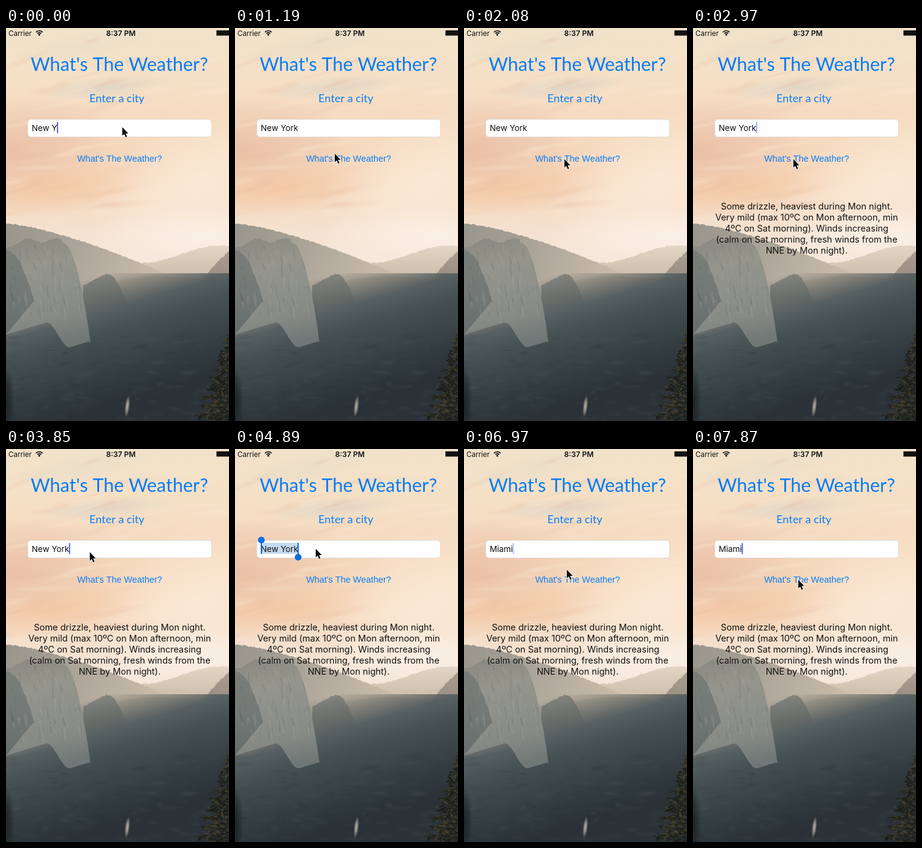
An HTML page with a canvas that plays this animation: 364x641 px, repeating every 8 s.

```html
<!DOCTYPE html>
<html lang="en">
<head>
<meta charset="utf-8">
<title>What's The Weather?</title>
<style>
html, body { margin: 0; width: 100%; height: 100%; overflow: hidden; background: #f3dfc6; }
canvas { display: block; width: 364px; height: 641px; }
</style>
</head>
<body>
<canvas id="stage"></canvas>
<script>
const W = 364, H = 641, LOOP = 8000, TICK = 148.2;
const BLUE = '#087cf5', INK = '#111', SANS = 'Inter, "Open Sans", sans-serif';
const ratio = window.devicePixelRatio || 1;

function setup(canvas) {
  canvas.width = W * ratio;
  canvas.height = H * ratio;
  const c = canvas.getContext('2d');
  c.scale(ratio, ratio);
  return c;
}
const ctx = setup(document.getElementById('stage'));
const photo = document.createElement('canvas');
const bg = setup(photo);

let seed = 11;
const rnd = () => (seed = (seed * 16807) % 2147483647) / 2147483647;
const span = (a, b) => a + (b - a) * rnd();
const clamp = v => Math.min(1, Math.max(0, v));
const smooth = v => (v = clamp(v)) * v * (3 - 2 * v);

function linear(x0, y0, x1, y1, ...stops) {
  const g = bg.createLinearGradient(x0, y0, x1, y1);
  stops.forEach((s, i) => g.addColorStop(i / (stops.length - 1), s));
  return g;
}

// Soft elliptical patch of colour.
function blob(x, y, rx, ry, turn, rgb, alpha) {
  bg.save();
  bg.translate(x, y);
  bg.rotate(turn);
  bg.scale(rx, ry);
  const g = bg.createRadialGradient(0, 0, 0, 0, 0, 1);
  g.addColorStop(0, `rgba(${rgb},${alpha})`);
  g.addColorStop(0.5, `rgba(${rgb},${alpha * 0.6})`);
  g.addColorStop(1, `rgba(${rgb},0)`);
  bg.fillStyle = g;
  bg.fillRect(-1, -1, 2, 2);
  bg.restore();
}

// Area between two height curves, with a slightly ragged top.
function ridge(x0, x1, top, bottom, fill, rough = 1) {
  bg.beginPath();
  for (let x = x0; x <= x1; x += 2) bg.lineTo(x, top(x) + span(-rough, rough));
  for (let x = x1; x >= x0; x -= 2) bg.lineTo(x, Math.max(top(x), bottom(x)));
  bg.fillStyle = fill;
  bg.fill();
}

function paintSky() {
  bg.fillStyle = linear(0, 0, 0, 390, '#f1e2ca', '#f5e0c6', '#f5dabf', '#f5d6ba', '#f5dfcb', '#f5e8dc');
  bg.fillRect(0, 0, W, 420);
  blob(10, 200, 180, 85, -0.15, '230,184,160', 0.7);
  blob(80, 265, 180, 40, -0.12, '243,195,155', 0.65);
  blob(320, 250, 190, 110, -0.3, '251,235,217', 0.9);
  blob(330, 340, 200, 50, 0, '250,240,231', 0.9);
  blob(160, 97, 110, 18, -0.1, '215,212,203', 0.6);
  blob(120, 30, 130, 22, -0.2, '224,217,201', 0.4);
  for (let i = 0; i < 75; i++) {
    const x = span(-30, W), y = span(20, 310), warm = rnd() < 0.45 && x < 200;
    blob(x, y, span(18, 70), span(2, 7), span(-0.4, -0.02), warm ? '231,185,158' : '251,234,213', span(0.1, 0.32));
  }
}

const cliffTop = x => x < 92
  ? 346 + 12 * Math.exp(-x / 14) + 3.5 * Math.sin(x / 7.5)
  : 350 + 163 * ((x - 92) / 46) ** 2;
const cliffFoot = x => 500 - 0.3 * x + 52 * smooth((x - 65) / 40);

function paintMountains() {
  const floor = () => 520;
  ridge(150, 366, x => 383 - 28 * smooth((x - 225) / 120), floor,
    linear(0, 355, 0, 460, '#e3d5c5', '#cbbcaa', '#a39a8d'));
  ridge(0, 330, x => 319 + 0.034 * x ** 1.4, floor,
    linear(0, 340, 250, 420, '#99968d', '#a5a095', '#b9afa1', '#cbbcaa'));
  ridge(170, 366, x => 412 - 8 * Math.sin((x - 180) / 45), floor,
    linear(0, 402, 0, 500, '#b9ac9b', '#99938a', '#77786f'));
  ridge(260, 366, x => 365 + 0.5 * Math.max(0, 364 - x) ** 1.2, floor,
    linear(340, 368, 320, 490, '#a99b8d', '#8f867c', '#6b6e69'));
  ridge(126, 200, x => x < 164 ? 401 + (164 - x) / 2 : 401 + 58 * ((x - 164) / 36) ** 2, () => 475,
    linear(0, 402, 0, 470, '#85857f', '#777a76', '#6b706d'));

  // Forest floor, cut by the slanting edge of the light
  bg.fillStyle = linear(125, 410, 185, 610, 'rgba(110,112,105,0)', 'rgba(102,106,101,.55)', '#586162',
    '#475254', '#3f4a4d', '#384246', '#30393e', '#2a3238');
  bg.fillRect(0, 400, W, 241);
  for (let i = 0; i < 230; i++) {
    blob(span(0, W), span(500, 645), span(5, 24), span(2, 6), span(-0.25, 0.15),
      rnd() < 0.55 ? '36,45,50' : '82,90,90', span(0.06, 0.2));
  }

  ridge(0, 138, cliffTop, cliffFoot, linear(50, 340, 90, 515, '#8b8a82', '#95958c', '#8e918a', '#858a85', '#6f7876'));
  ridge(0, 46, x => 362 + 0.04 * x * x, x => 500 - 1.2 * x, linear(0, 360, 0, 495, '#7a7d78', '#737a77', '#656e6d'), 2);
  for (let i = 0; i < 80; i++) {
    const x = span(5, 122), y = span(cliffTop(x) + 5, 465);
    bg.strokeStyle = rnd() < 0.5 ? 'rgba(75,83,84,.16)' : 'rgba(190,184,170,.18)';
    bg.lineWidth = span(0.8, 2.6);
    bg.beginPath();
    bg.moveTo(x, y);
    bg.lineTo(x + span(1, 5), y + span(6, 22));
    bg.stroke();
  }

  blob(0, 610, 14, 60, 0, '22,29,32', 0.8);
  blob(198, 617, 4, 18, 0.12, '205,194,176', 0.9);
}

function paintTree() {
  bg.lineCap = 'round';
  for (let y = 498; y < 650; y += 2.2) {
    const reach = (3 + (y - 498) * 0.37) * (0.78 + 0.22 * Math.sin(y * 0.42));
    for (let d = 0; d < reach; d += 4) {
      const x = 366 - d + span(-2, 2), tip = d / reach;
      bg.strokeStyle = rnd() < 0.1 + 0.25 * tip ? '#4b3f26' : rnd() < 0.5 ? '#1b1d17' : '#282a20';
      bg.lineWidth = span(0.8, 2.4);
      bg.beginPath();
      bg.moveTo(x, y);
      bg.lineTo(x - span(2, 6), y + span(-3, 4));
      bg.stroke();
    }
  }
}

paintSky();
paintMountains();
paintTree();

function text(str, x, y, font, color, align = 'left') {
  ctx.font = font;
  ctx.fillStyle = color;
  ctx.textAlign = align;
  ctx.fillText(str, x, y);
}

function disc(x, y, r) {
  ctx.beginPath();
  ctx.arc(x, y, r, 0, 7);
  ctx.fill();
}

function drawStatus() {
  text('Carrier', 4, 12.5, '11.6px ' + SANS, INK);
  text('8:37 PM', 187.5, 12.5, '600 12px ' + SANS, INK, 'center');
  ctx.strokeStyle = INK;
  ctx.lineWidth = 1.7;
  for (const r of [4.3, 7.5]) {
    ctx.beginPath();
    ctx.arc(54.3, 12, r, -Math.PI * 0.76, -Math.PI * 0.24);
    ctx.stroke();
  }
  disc(54.3, 10.9, 1.6);
  ctx.fillRect(343.5, 3.8, 21, 8.6);
}

// Ticks at which the text is selected, retyped and first blinks again.
const SELECT = 30, RETYPE = 39;

function drawField(n) {
  ctx.beginPath();
  ctx.roundRect(35.5, 149, 300, 28.8, 5);
  ctx.fillStyle = '#fefefe';
  ctx.fill();
  ctx.strokeStyle = '#ddd5cd';
  ctx.lineWidth = 0.8;
  ctx.stroke();

  const typed = n < RETYPE ? 'New York'.slice(0, 5 + n) : 'Miami'.slice(0, n - RETYPE + 1);
  const font = '13.4px ' + SANS;
  ctx.font = font;
  const end = 42 + ctx.measureText(typed).width;
  const selected = n >= SELECT && n < RETYPE;
  if (selected) {
    ctx.fillStyle = '#c5daf1';
    ctx.fillRect(43, 153, end - 43, 18);
  }
  text(typed, 42, 167.6, font, INK);

  if (selected) {
    const k = n - SELECT;
    const r = 5.7 * (1 - 0.6 * Math.cos(k * 2.2) * Math.exp(-0.9 * k));
    ctx.fillStyle = '#0b6fe0';
    ctx.fillRect(42, 150, 2, 21);
    ctx.fillRect(end - 1, 153, 2, 21);
    disc(43, 148.4, r);
    disc(end, 176.4, r);
  } else {
    ctx.globalAlpha = caret(n);
    ctx.fillStyle = '#4a63e8';
    ctx.fillRect(end - 0.3, 153.5, 1.9, 18);
    ctx.globalAlpha = 1;
  }
}

// The caret stays solid while typing, then fades out every seven ticks.
function caret(n) {
  const late = n >= RETYPE, since = n - (late ? 46 : 6);
  return since < 0 ? 1 : clamp(Math.abs(since % 7 - (late ? 2.3 : 1.5)) - 0.9);
}

// Pointer stops: tick, x, y.
const path = [[5, 189, 161], [8, 162, 204], [10, 163, 213], [22, 163, 213], [26, 136, 167.5],
  [28, 131, 162], [45, 131, 162], [47, 167, 196], [50, 171, 212.5]];

function pointer(n) {
  const next = path.findIndex(p => n <= p[0]);
  if (next < 1) return path.at(next).slice(1);
  const [t0, x0, y0] = path[next - 1], [t1, x1, y1] = path[next];
  const k = (n - t0) / (t1 - t0);
  return [x0 + (x1 - x0) * k, y0 + (y1 - y0) * k];
}

const arrow = new Path2D('M0 0V14L3.2 11.1 5.5 16.4 7.7 15.4 5.5 10.3H9.8Z');

function drawPointer(n) {
  const [x, y] = pointer(n);
  ctx.save();
  ctx.translate(x + 0.8, y + 0.8);
  ctx.lineJoin = 'round';
  ctx.lineWidth = 1.7;
  ctx.strokeStyle = '#fff';
  ctx.stroke(arrow);
  ctx.fillStyle = '#0a0a0a';
  ctx.fill(arrow);
  ctx.restore();
}

const forecast = ['Some drizzle, heaviest during Mon night.', 'Very mild (max 10ºC on Mon afternoon, min',
  '4ºC on Sat morning). Winds increasing', '(calm on Sat morning, fresh winds from the', 'NNE by Mon night).'];

function draw(now) {
  const n = Math.floor((now % LOOP + 12) / TICK);
  ctx.drawImage(photo, 0, 0, W, H);
  drawStatus();
  text("What's The Weather?", 185, 70, '30.5px Lato, sans-serif', BLUE, 'center');
  text('Enter a city', 181, 121, '18.1px Lato, sans-serif', BLUE, 'center');
  drawField(n);
  // Pressed at tick 11, then back to full strength
  ctx.globalAlpha = n < 11 ? 1 : clamp(0.25 + (n - 11) * 0.25);
  text("What's The Weather?", 185.5, 217.5, '14.4px "Liberation Sans", Arial, sans-serif', BLUE, 'center');
  ctx.globalAlpha = 1;
  if (n >= 15) forecast.forEach((line, i) => text(line, 185.5, 296.3 + i * 17.9, '14.5px ' + SANS, INK, 'center'));
  drawPointer(n);
}

const start = performance.now();
function frame() {
  draw(performance.now() - start);
  requestAnimationFrame(frame);
}
frame();
</script>
</body>
</html>
```
